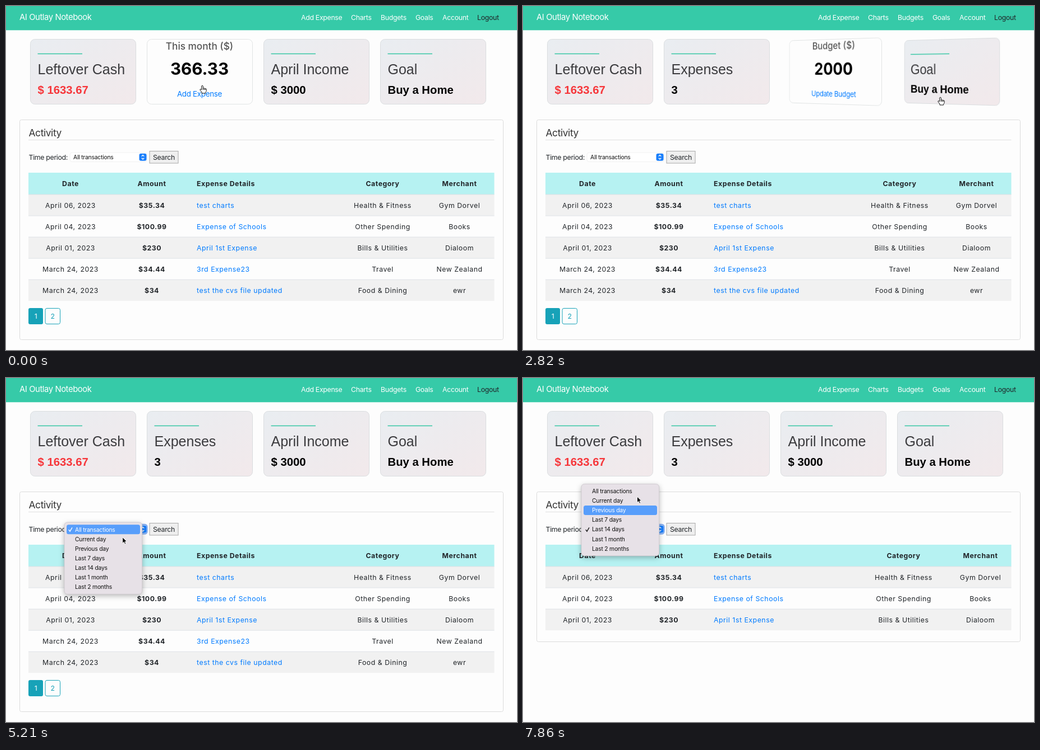
Animation of 911 by 615 pixels, one loop 8000 ms. Source, as an HTML page:

```html
<!DOCTYPE html>
<html lang="en">
<head>
<meta charset="utf-8">
<title>Expense dashboard</title>
<style>
  html, body { margin: 0; width: 100%; height: 100%; overflow: hidden; background: #fdfdfd; }
  svg, .face { position: absolute; left: 0; top: 0; overflow: visible; }
  svg { width: 100%; height: 100%; }
  .card { position: absolute; top: 59px; width: 189px; height: 117px; }
  .face { width: 100%; height: 100%; backface-visibility: hidden; }
  text { font-family: Inter, sans-serif; font-size: 12.3px; fill: #212529; white-space: pre; }
  .mid { text-anchor: middle; }
  .brand { font-size: 14.8px; letter-spacing: -.4px; fill: #fff; }
  .nav { letter-spacing: -.3px; fill: #fff; }
  .label { letter-spacing: -.3px; }
  .heading { font-size: 17.4px; letter-spacing: -.4px; fill: #333; }
  .cell { letter-spacing: .53px; }
  .bold { font-weight: 700; }
  .link { fill: #007bff; }
  .small { font-size: 10.3px; letter-spacing: -.2px; fill: #111; }
  .title { font: 25px "Liberation Sans", sans-serif; fill: #3b3b3e; }
  .value { font: bold 20.3px "Liberation Sans", sans-serif; fill: #000; }
  .back-title { font-size: 17.2px; font-weight: 500; fill: #555; }
  .back-value { font-size: 29.6px; font-weight: 700; fill: #000; }
  .back-link { font-size: 13.3px; letter-spacing: -.25px; fill: #007bff; }
  .hover { fill: #0056b3; text-decoration: underline; }
</style>
</head>
<body>
<svg id="page"></svg>
<div id="cards"></div>
<svg id="overlay"></svg>
<script>
const LOOP = 8000, STEP = 148.2;
const $ = id => document.getElementById(id);
const text = (x, y, s, cls = '') => `<text x="${x}" y="${y}" class="${cls}">${s}</text>`;
const rect = (x, y, w, h, fill, more = '') =>
  `<rect x="${x}" y="${y}" width="${w}" height="${h}" fill="${fill}" ${more}/>`;
const show = (el, on) => { el.style.display = on ? '' : 'none'; };

const rows = [
  ['April 06, 2023', '$35.34', 'test charts', 'Health &amp; Fitness', 'Gym Dorvel'],
  ['April 04, 2023', '$100.99', 'Expense of Schools', 'Other Spending', 'Books'],
  ['April 01, 2023', '$230', 'April 1st Expense', 'Bills &amp; Utilities', 'Dialoom'],
  ['March 24, 2023', '$34.44', '3rd Expense23', 'Travel', 'New Zealand'],
  ['March 24, 2023', '$34', 'test the cvs file updated', 'Food &amp; Dining', 'ewr'],
];

function tableRow([date, amount, details, category, merchant], y, shift, head) {
  const bold = head ? ' bold' : '';
  return text(115, y, date, 'cell mid' + bold) + text(260, y, amount, 'cell mid bold') +
    text(340, y, details, 'cell' + (head ? bold : ' link')) +
    text(671.5 + shift, y, category, 'cell mid' + bold) +
    text(808.5 + shift, y, merchant, 'cell mid' + bold);
}

function table(id, count, shift, bottom) {
  const body = rows.slice(0, count).map((row, i) => {
    const y = 337 + i * 38.05;
    return rect(40, y, 830.5, 38, i % 2 ? '#fdfdfd' : '#f1f1f1') +
      rect(40, y - .5, 830.5, 1, '#dee2e6') + tableRow(row, y + 23.7, shift);
  }).join('');
  return `<g id="${id}">` +
    rect(24.5, 203.5, 862, bottom - 203.5, 'none', 'rx="3" stroke="#dcdcdc"') +
    rect(40, 298, 830.5, 39, '#b6f2f2') +
    tableRow(['Date', 'Amount', 'Expense Details', 'Category', 'Merchant'], 322, shift, true) +
    body + '</g>';
}

const menu = [['Add Expense', 526], ['Charts', 615], ['Budgets', 668], ['Goals', 730], ['Account', 778]];
$('page').innerHTML =
  rect(0, 0, 911, 43.3, '#36caa8') + text(24, 25.3, 'AI Outlay Notebook', 'brand') +
  menu.map(([s, x]) => text(x, 25, s, 'nav')).join('') +
  `<g style="--c:#000">${text(840, 25, 'Logout', 'label')}</g>` +
  table('longTable', 5, 0, 596.5) + table('shortTable', 3, 7, 471.5) +
  text(40.5, 232.5, 'Activity', 'heading') + rect(40, 239, 830.5, 1, '#dfdfe0') +
  text(40.5, 274.7, 'Time period:', 'label') +
  rect(114, 262, 137.5, 16.5, '#fff', 'id="select" rx="4"') +
  `<text id="choice" x="120" y="274.4" class="small"></text>` +
  rect(237.5, 263.7, 13, 13, '#1a7ffb', 'rx="3.2"') +
  '<path d="M241.8 268.8l2.2-2.3 2.2 2.3M241.8 271.7l2.2 2.3 2.2-2.3" fill="none" stroke="#fff" stroke-width="1.3"/>' +
  rect(256, 259.5, 51, 21.5, '#efefef', 'stroke="#a8a8a8"') + text(262, 274.7, 'Search', 'label') +
  `<g id="pager">${rect(40, 540, 26, 29, '#17a2b8', 'rx="3"')}` +
  rect(70, 540.5, 26.5, 28, '#fdfdfd', 'rx="3" stroke="#17a2b8"') +
  `<g style="fill:#fff">${text(53, 559, '1', 'mid nav')}</g>` +
  '<text x="83.2" y="559" class="mid" style="fill:#17a2b8">2</text></g>';

// Cards: front title and value, back title, value and link, hover in/out times
const cards = [
  { front: ['Leftover Cash', '$ 1633.67'], color: '#f6373b' },
  { front: ['Expenses', '3'], back: ['This month ($)', '366.33', 'Add Expense'], enter: -LOOP, leave: 1317 },
  { front: ['April Income', '$ 3000'], back: ['Budget ($)', '2000', 'Update Budget'], enter: 1317, leave: 2740 },
  { front: ['Goal', 'Buy a Home'], back: ['Saving ($)', '8233.67', 'Update Goal'], enter: 2746, leave: 3715 },
];
const outline = (fill, stroke) => rect(.5, .5, 188, 116, fill, `rx="8" stroke="${stroke}"`);

cards.forEach((card, i) => {
  const el = document.createElement('div');
  el.className = 'card';
  el.style.left = 43 + 208 * i + 'px';
  const [title, value] = card.front;
  let html = `<div class="face"><svg><defs><linearGradient id="shade${i}" x2="1" y2="1">
    <stop stop-color="#e9edf1"/><stop offset="1" stop-color="#f2e9eb"/></linearGradient></defs>` +
    outline(`url(#shade${i})`, '#dadddf') + rect(13.5, 25.7, 79.5, 1.5, '#36c6a4') +
    text(13.5, 63.3, title, 'title') +
    `<text x="13.5" y="97.5" class="value" style="fill:${card.color || '#000'}">${value}</text></svg></div>`;
  if (card.back) {
    const [name, number, link] = card.back;
    html += `<div class="face"><svg>${outline('#fdfdfd', '#e1e4e4')}` +
      text(94, 18.5, name, 'mid back-title') + text(94, 63.8, number, 'mid back-value') +
      text(94, 103.2, link, 'mid back-link') + '</svg></div>';
  }
  el.innerHTML = html;
  $('cards').append(el);
  card.faces = el.children;
});
const goalLink = cards[3].faces[1].querySelector('.back-link');

const periods = ['All transactions', 'Current day', 'Previous day', 'Last 7 days',
  'Last 14 days', 'Last 1 month', 'Last 2 months'];
$('overlay').innerHTML =
  '<g id="popup">' +
  rect(104, -12.7, 138.7, 128.4, '#e7e1e7', 'rx="5.5" stroke="#c9c5c9" stroke-width=".8" style="filter:drop-shadow(0 3px 5px #0004)"') +
  rect(108, -8.5, 131, 17, '#589efb', 'id="highlight" rx="3.5"') +
  periods.map((s, i) => text(123, 17.1 * i + 3.8, s, 'small item')).join('') +
  '<path id="check" d="M111.8 .5l2.2 3 4-6.8" fill="none" stroke="#111" stroke-width="1.3"/></g>' +
  '<g id="cursor">' +
  '<path id="arrow" d="M0 0V10.8L2.5 8.5 4.2 12.3 6 11.5 4.4 7.8H7.7Z" fill="#000" stroke="#fff" stroke-width=".9"/>' +
  '<path id="hand" d="M-1.3 1Q0-1 1.3 1V5.2Q2.4 4 3.4 5.3 4.6 4.3 5.3 5.8 7 5.2 7.2 7V9.5Q7 11.5 5.7 12.2V14H-1V12.2L-4 8.2Q-4.4 6.2-2.6 6.6L-1.3 8ZM1.3 5V8M3.4 5.4V8M5.3 6V8" fill="#fff" stroke="#111" stroke-width="1" stroke-linejoin="round"/></g>';
const items = document.querySelectorAll('.item');

// Pointer tip: time, x, y
const path = [
  [600, 350, 142], [1040, 355, 150], [1193, 395, 158], [1341, 528, 161], [1490, 548, 164],
  [1640, 550, 165], [2525, 550, 165], [2675, 600, 167], [2823, 744, 163], [3120, 764, 153],
  [3420, 765, 156], [3570, 765, 156], [3712, 767.5, 176.5], [4010, 620, 225], [4310, 320, 277],
  [4601, 213.7, 267], [5046, 213.7, 267], [5640, 190, 338], [5787, 225, 322], [5935, 280.3, 290],
  [6083, 279, 273], [6231, 278, 271.5], [6825, 278, 271.5], [7270, 206, 268], [7417, 204, 265],
  [7565, 204, 265], [7714, 204, 238], [7862, 203.5, 212],
];
function pointer(t) {
  const k = path.findIndex(p => p[0] >= t);
  if (k < 1) return (k ? path[path.length - 1] : path[0]).slice(1);
  const [a, b] = [path[k - 1], path[k]], f = (t - a[0]) / (b[0] - a[0]);
  return [1, 2].map(n => a[n] + (b[n] - a[n]) * f);
}

// CSS "ease" curve
const bezier = (a, b, s) => 3 * a * s * (1 - s) ** 2 + 3 * b * s * s * (1 - s) + s ** 3;
function ease(x) {
  if (x <= 0 || x >= 1) return x <= 0 ? 0 : 1;
  let lo = 0, hi = 1;
  for (let i = 0; i < 20; i++) {
    const s = (lo + hi) / 2;
    if (bezier(.25, .25, s) < x) lo = s; else hi = s;
  }
  return bezier(.1, 1, lo);
}
const turn = (el, angle) => {
  el.style.transform = angle ? `perspective(1000px) rotateY(${angle}deg)` : 'none';
};

function draw(now) {
  // The screen refreshes in coarse steps
  const t = 600 + STEP * Math.floor((now % LOOP - 590) / STEP);

  for (const { faces, enter, leave } of cards) {
    if (!faces[1]) continue;
    const flip = ease((t - enter) / 600) - ease((t - leave) / 600);
    turn(faces[0], -180 * flip);
    turn(faces[1], -180 * (1 - flip));
  }
  goalLink.classList.toggle('hover', t > 3100 && t < 3800);

  const filtered = t > 6500, focused = t > 4740 && !filtered || t > 7400;
  show($('longTable'), !filtered);
  show($('pager'), !filtered);
  show($('shortTable'), filtered);
  $('choice').textContent = periods[t > 6060 ? 4 : 0];
  $('select').setAttribute('style', focused
    ? 'fill:#efefef;stroke:#82adf2;stroke-width:2.4' : 'fill:#fff;stroke:#eee;stroke-width:.8');

  const open = t > 4740 && t < 5780 || t > 7400;
  show($('popup'), open);
  if (open) {
    const checked = filtered ? 4 : 0, top = 270.7 - 17.1 * checked;
    const active = Math.max(0, Math.min(6, Math.round((pointer(t - 120)[1] - top) / 17.1)));
    $('popup').setAttribute('transform', `translate(0 ${top})`);
    $('highlight').setAttribute('transform', `translate(0 ${17.1 * active})`);
    $('check').setAttribute('transform', `translate(0 ${17.1 * checked})`);
    $('check').style.stroke = active === checked ? '#fff' : '#111';
    items.forEach((item, i) => { item.style.fill = i === active ? '#fff' : '#111'; });
  }

  $('cursor').setAttribute('transform', `translate(${pointer(t)})`);
  show($('hand'), t < 3700);
  show($('arrow'), t >= 3700);
  requestAnimationFrame(() => draw(performance.now()));
}
draw(0);
</script>
</body>
</html>
```
